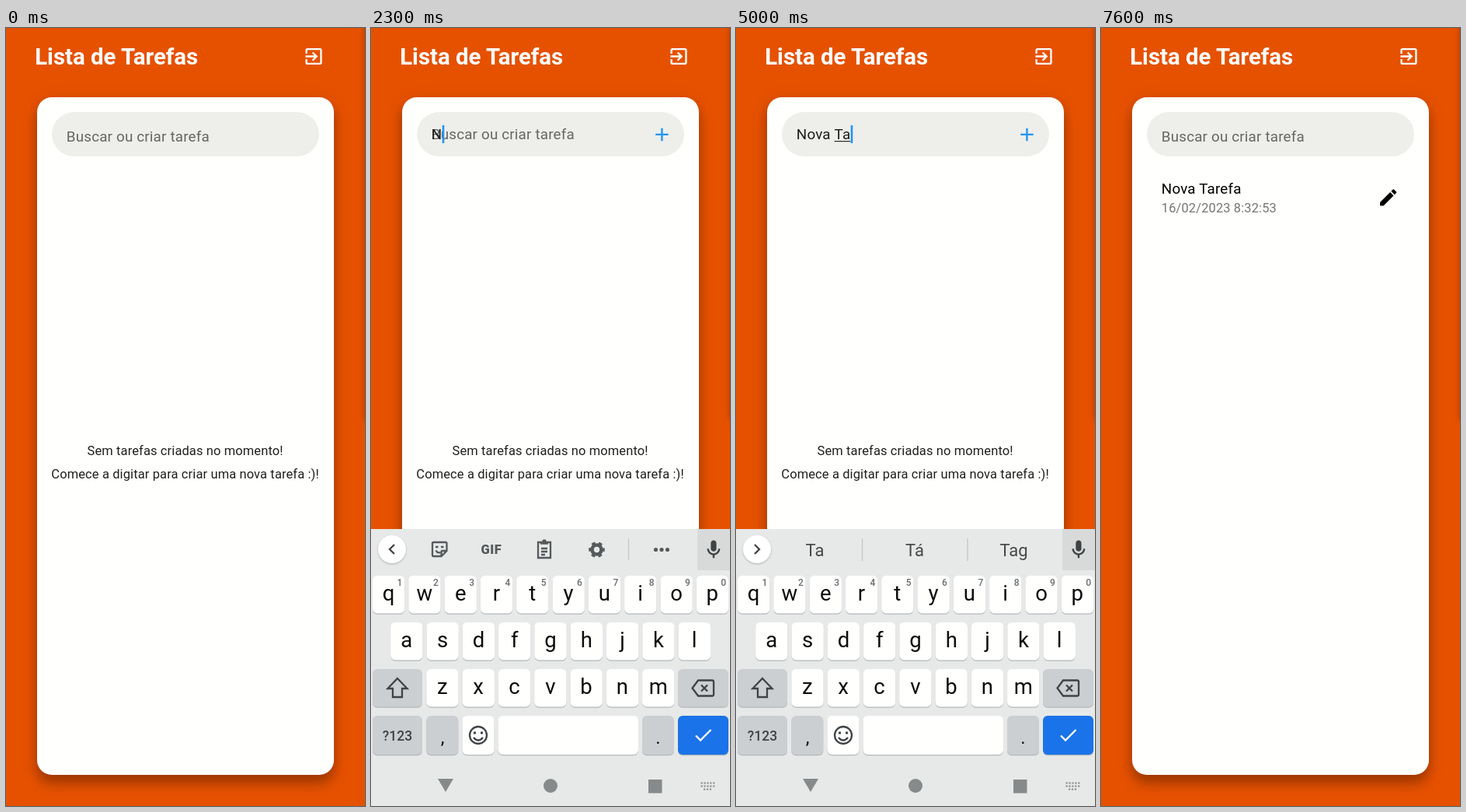
Write an HTML page that moves like this. It is 462 px wide and 1000 px high and loops after 8 s.

```html
<!DOCTYPE html>
<html lang="pt">
<head>
<meta charset="utf-8">
<title>Lista de Tarefas</title>
<style>
  html, body { margin: 0; width: 100%; height: 100%; overflow: hidden; background: #e65100; }
  svg { display: block; width: 462px; height: 1000px; font-family: Roboto, sans-serif; }
  .title { font-size: 29.4px; font-weight: 700; fill: #fff; }
  .body { font-size: 18.82px; letter-spacing: .18px; }
  .small { font-size: 16.47px; letter-spacing: .13px; }
  .mid { text-anchor: middle; }
  .letter { font-size: 27.5px; fill: #0c0c0c; }
  .digit { font-size: 12px; font-weight: 500; fill: #6a6d6e; }
  .word { font-size: 22px; fill: #46494b; }
  .line { fill: none; stroke: #3f4345; stroke-width: 2.3; }
  .card { fill: #fffffd; filter: drop-shadow(0 11px 8px rgba(0,0,0,.27)) drop-shadow(0 2px 9px rgba(0,0,0,.1)); }
  .edge { filter: drop-shadow(0 4px 4px rgba(0,0,0,.35)); }
  .disc { fill: #fff; filter: drop-shadow(0 1px 1px rgba(0,0,0,.25)); }
</style>
</head>
<body>
<svg viewBox="0 0 462 1000">
  <rect width="462" height="1000" fill="#e65100"/>
  <rect class="edge" x="463" y="-20" width="12" height="520"/>
  <text class="title" x="37.2" y="47">Lista de Tarefas</text>
  <path fill="#fff" transform="translate(381.9 22.4) scale(1.1765)" d="M10.09 15.59L11.5 17l5-5-5-5-1.41 1.41L12.67 11H3v2h9.67zM19 3H5c-1.1 0-2 .9-2 2v4h2V5h14v14H5v-4H3v4c0 1.1.9 2 2 2h14c1.1 0 2-.9 2-2V5c0-1.1-.9-2-2-2z"/>
  <rect class="card" x="40" y="89" width="382" height="871" rx="19"/>
  <rect x="59" y="108" width="344" height="57" rx="28.5" fill="#eeeeea"/>

  <text id="hint" class="body" x="77.8" y="146" fill="#666664">Buscar ou criar tarefa</text>
  <text id="field" class="body" x="77.8" y="143" fill="#1c1c1b"></text>
  <rect id="under" y="145" height="1.2" fill="#2a2a2a"/>
  <rect id="caret" width="2.6" fill="#2196f3"/>
  <path id="plus" fill="#2196f3" transform="translate(360.3 122.8) scale(1.1765)" d="M19 13h-6v6h-2v-6H5v-2h6V5h2v6h6z"/>

  <g id="empty" class="small mid" fill="#1f1f1f">
    <text x="230.6" y="549">Sem tarefas criadas no momento!</text>
    <text x="230.6" y="579">Comece a digitar para criar uma nova tarefa :)!</text>
  </g>
  <g id="task">
    <text class="body" x="77.8" y="213">Nova Tarefa</text>
    <text class="small" x="77.8" y="237" fill="#757575">16/02/2023 8:32:53</text>
    <path transform="translate(355.6 203.8) scale(1.1765)" d="M3 17.25V21h3.75L17.81 9.94l-3.75-3.75zM20.71 7.04c.39-.39.39-1.02 0-1.41l-2.34-2.34c-.39-.39-1.02-.39-1.41 0l-1.83 1.83 3.75 3.75z"/>
  </g>

  <g id="board">
    <rect y="644" width="462" height="700" fill="#e7e9e8"/>
    <rect x="420" y="644" width="42" height="53" fill="#d7dad9"/>
    <g transform="translate(426.5 656) scale(1.2)" fill="#3f4345">
      <path d="M12 14c1.66 0 3-1.34 3-3V5c0-1.66-1.34-3-3-3S9 3.34 9 5v6c0 1.66 1.34 3 3 3z"/>
      <path d="M17 11c0 2.76-2.24 5-5 5s-5-2.24-5-5H5c0 3.53 2.61 6.43 6 6.92V21h2v-3.08c3.39-.49 6-3.39 6-6.92z"/>
    </g>
    <circle class="disc" cx="27" cy="670" r="18"/>
    <path id="chevron" class="line" d="M30 664l-6 6 6 6"/>
    <g id="tools">
      <g class="line" style="stroke:#55595b">
        <path d="M80.500 661h15.500q1.500 0 1.500 1.500v9.500l-7 7h-10q-1.500 0-1.500-1.500v-15q0-1.500 1.500-1.500M97 672h-5q-1.500 0-1.500 1.500v5"/>
        <path d="M83.500 671.500q2 4 6 2.500M83 667h3.500M90 667h3.500"/>
        <path d="M215 661h16v20h-16zM218 662.500h10M219 669h8M219 673h8M219 677h5"/>
        <circle cx="223" cy="660" r="1.500"/>
        <circle cx="290.500" cy="670.500" r="6" stroke-width="4.600"/>
        <circle cx="290.500" cy="670.500" r="8.500" stroke-width="3.600" stroke-dasharray="4.450" stroke-dashoffset="2.200"/>
      </g>
      <text class="mid" x="155" y="676" font-size="16.500" font-weight="900" letter-spacing=".5" fill="#55595b">GIF</text>
      <path d="M331.500 656v28" stroke="#c3c7c8" stroke-width="1.300"/>
      <g fill="#55595b"><circle cx="366.500" cy="670.500" r="2.600"/><circle cx="374" cy="670.500" r="2.600"/><circle cx="381.500" cy="670.500" r="2.600"/></g>
    </g>
    <g id="words">
      <path id="bars" d="M162.500 656v29M298 656v29" stroke="#c3c7c8" stroke-width="1.300"/>
      <text class="word mid" x="101.500" y="679"></text>
      <text class="word mid" x="230" y="679"></text>
      <text class="word mid" x="357.500" y="679"></text>
    </g>
    <g id="keys"></g>
    <path id="shift" class="line" d="M34 836l12.500 13h-6.500v11h-12v-11h-6.500z"/>
    <path class="line" d="M421 838.500h18q2 0 2 2v16q0 2-2 2h-18l-7.500-10zM425 844.500l8 8M433 844.500l-8 8"/>
    <g class="line">
      <circle cx="138" cy="909" r="11"/>
      <path d="M132 912q6 7 12 0"/>
      <path d="M133.500 904.500v3M142.500 904.500v3" stroke-width="3"/>
    </g>
    <path d="M418 909.500l6 6 13.500-13.500" fill="none" stroke="#fff" stroke-width="2.300"/>
    <text class="mid" x="34" y="916" font-size="17.500" font-weight="500" fill="#3f4345">?123</text>
    <text class="mid letter" x="92" y="920" style="font-size:24px">,</text>
    <text class="mid letter" x="369.500" y="920" style="font-size:24px">.</text>
  </g>

  <g id="nav" fill="#868a8b">
    <path d="M86 965h20l-10 17z"/>
    <circle cx="231" cy="974" r="9"/>
    <rect x="357" y="966" width="17.500" height="17.500"/>
    <path d="M424.500 970.500h18M424.500 974.500h18M428 978.500h11" stroke="#868a8b" stroke-width="2.200" stroke-dasharray="2.200 1.700"/>
  </g>
  <g id="ghost" fill="#fff" opacity=".4">
    <path d="M109 963v21l-18-10.500z"/>
    <circle cx="231" cy="974" r="9"/>
    <rect x="357" y="966" width="17.500" height="17.500"/>
  </g>
</svg>
<script>
const $ = id => document.getElementById(id);
const LOOP = 8000, STEP = 100, LEFT = 77.8;

// Each table: [start in ms, value]
const TYPED = [[0, ''], [2300, 'N'], [2900, 'No'], [3300, 'Nov'], [3500, 'Nova'], [4200, 'Nova '],
  [4700, 'Nova T'], [5000, 'Nova Ta'], [5200, 'Nova Tar'], [5600, 'Nova Tare'],
  [5700, 'Nova Taref'], [5800, 'Nova Tarefa'], [7300, '']];
const CARET = [[0, 0], [300, 1], [800, 0], [1400, 1], [1900, 0], [2300, 1], [4100, 0],
  [4200, 1], [6300, 0], [6800, 1], [7300, 0]];
const WORDS = [[0, null], [2500, 'Na,Não,No'], [2900, 'No,Não,Nos'], [3400, 'Nov,Nova,Novamente'],
  [3600, 'Nova,Boba,Belun'], [4200, 'de,vida,era'], [4800, 'T,Tem,Tudo'], [5000, 'Ta,Tá,Tag'],
  [5200, 'Tar,Tarde,Tango'], [5700, 'Taref,Tarefa,Tarefas'], [5800, 'Tarefa,Taref a,Taref and'], [7300, '']];
const BOARD = [[0, 1000], [500, 880], [600, 706], [700, 653], [800, 644],
  [7300, 672], [7400, 799], [7500, 932], [7600, 1000]];
const HINT = [[0, 1], [2400, .4], [2500, 0], [7300, .35], [7400, .7], [7500, 1]];

const at = (table, t) => table.filter(([start]) => start <= t).pop()[1];
const within = (t, a, b) => t >= a && t < b;
const show = (id, on) => $(id).setAttribute('visibility', on ? 'visible' : 'hidden');

function add(tag, attrs, text = '') {
  const el = document.createElementNS('http://www.w3.org/2000/svg', tag);
  for (const name in attrs) el.setAttribute(name, attrs[name]);
  el.textContent = text;
  return $('keys').appendChild(el);
}

function key(x, y, width, fill = '#fffffe', height = 48.5) {
  add('rect', { x, y: y + 1.2, width, height, rx: 6, fill: '#b4b8ba' });
  add('rect', { x, y, width, height, rx: 6, fill });
}

const letters = [];
[['qwertyuiop', 2], ['asdfghjkl', 25.2], ['zxcvbnm', 71.3]].forEach(([row, left], r) => {
  [...row].forEach((ch, i) => {
    const x = left + i * 46.3, y = 704 + r * 60;
    key(x, y, 41.3);
    letters.push(add('text', { class: 'letter mid', x: x + 20.6, y: y + 32 }, ch));
    if (!r) add('text', { class: 'digit mid', x: x + 35, y: y + 13 }, (i + 1) % 10);
  });
});
const GREY = '#cbcfd2';
key(2, 824, 64, GREY);
key(395, 824, 65, GREY);
key(2, 884, 64, GREY, 50);
key(71.3, 884, 41, GREY, 50);
key(117.5, 884, 41, '#fffffe', 50);
key(163.5, 884, 180.500, '#fffffe', 50);
key(349, 884, 41, GREY, 50);
key(395, 884, 65, '#1a73e8', 50);

function measure(text) {
  $('field').textContent = text.replace(/ /g, '\u00a0');
  return text ? $('field').getComputedTextLength() : 0;
}

function drawField(t) {
  const text = at(TYPED, t);
  const from = measure(text.slice(0, text.lastIndexOf(' ') + 1));
  const end = measure(text);
  $('under').setAttribute('x', LEFT + from);
  $('under').setAttribute('width', t < 2400 ? 0 : Math.max(0, end - from));
  $('caret').setAttribute('x', LEFT + end + .3);
  $('caret').setAttribute('y', text ? 125 : 131);
  $('caret').setAttribute('height', text ? 23 : 18);
  $('hint').setAttribute('y', text ? 143 : 146);
  $('hint').setAttribute('opacity', at(HINT, t));
  show('caret', at(CARET, t));
  show('plus', text);
}

function drawBoard(t) {
  const words = at(WORDS, t), caps = within(t, 4500, 4700);
  $('board').setAttribute('transform', `translate(0 ${at(BOARD, t) - 644})`);
  show('board', within(t, 500, 7600));
  $('tools').style.display = words === null ? '' : 'none';
  $('bars').style.display = words ? '' : 'none';
  $('chevron').setAttribute('d', words === null ? 'M30 664l-6 6 6 6' : 'M24 664l6 6-6 6');
  const list = (words || '').split(',');
  $('words').querySelectorAll('text').forEach((el, i) => el.textContent = list[i] || '');
  letters.forEach(el => {
    const ch = el.textContent;
    el.textContent = caps ? ch.toUpperCase() : ch.toLowerCase();
  });
  $('shift').style.fill = caps ? '#3f4345' : 'none';
  show('nav', within(t, 500, 7300));
  show('ghost', within(t, 7300, 7600));
}

let last = -1;
function tick(now) {
  const t = Math.floor((now % LOOP) / STEP) * STEP;
  if (t !== last) {
    last = t;
    drawField(t);
    drawBoard(t);
    show('empty', t < 7300);
    show('task', t >= 7300);
  }
  requestAnimationFrame(tick);
}
const origin = performance.now();
const run = () => Math.max(0, performance.now() - origin);
tick(0);
(function loop() {
  requestAnimationFrame(loop);
  last = -1;
}).length;
</script>
</body>
</html>
```
